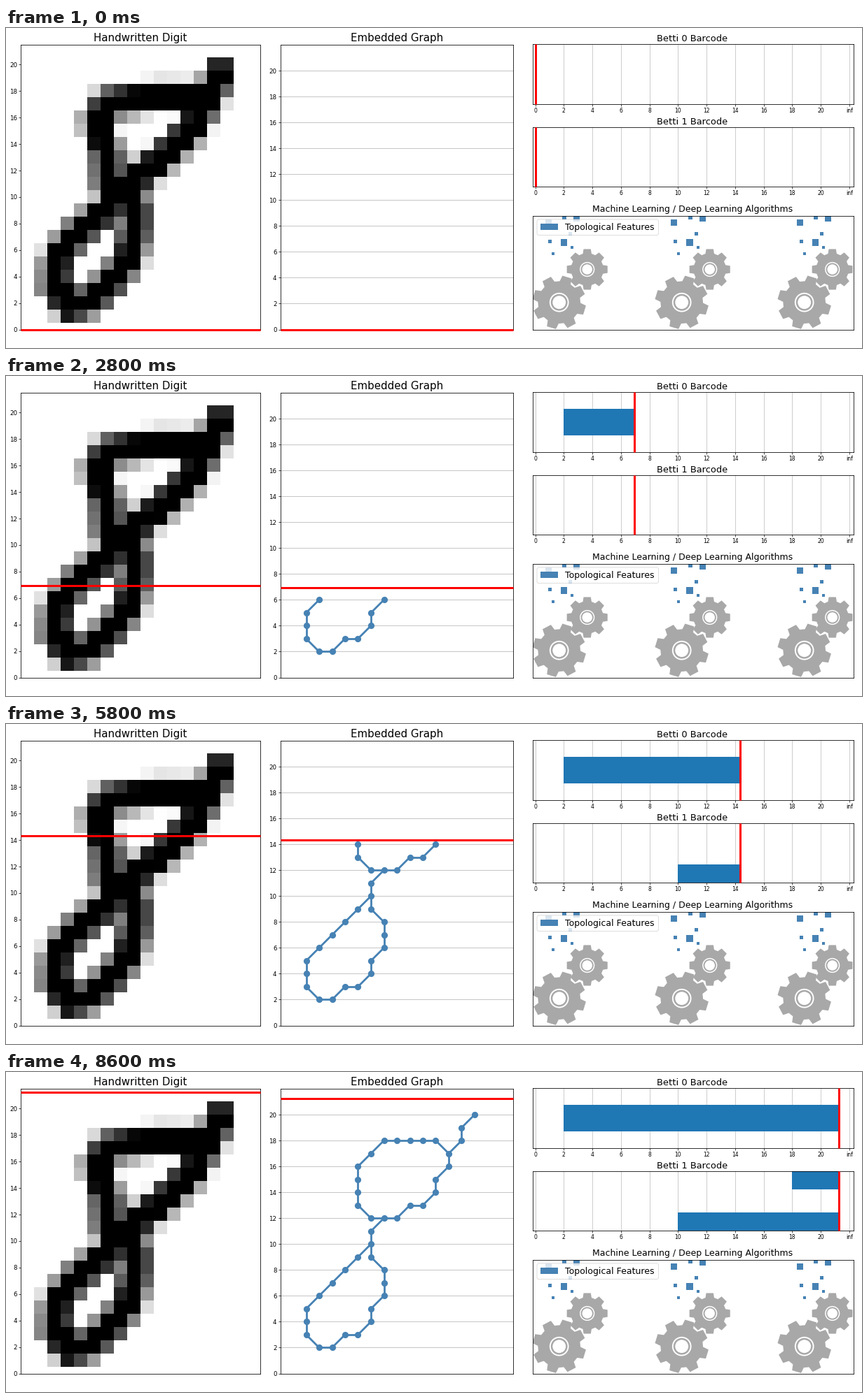
A matplotlib script for the animation above (8700 ms loop, 1222x458 px).

```python
import numpy as np
import matplotlib.pyplot as plt
from matplotlib.animation import FuncAnimation
from matplotlib.collections import LineCollection
from matplotlib.patches import Circle, FancyBboxPatch, Polygon, Rectangle

W, H, DPI = 1222, 458, 64
PT = 72 / DPI  # points per pixel
FRAMES, INTERVAL = 87, 100
STEP = 22 / 89  # sweep height gained per frame
STEEL, BLUE, GEAR, GRID = "steelblue", "#1f77b4", "#a8a8a8", "#b8b8b8"

plt.rcParams["font.family"] = "DejaVu Sans"
fig = plt.figure(figsize=(W / DPI, H / DPI), dpi=DPI, facecolor="white")


def panel(left, top, right, bottom, xlim, ylim):
    ax = fig.add_axes([left / W, 1 - bottom / H, (right - left) / W, (bottom - top) / H])
    ax.set(xlim=xlim, ylim=ylim, xticks=[], yticks=[])
    for spine in ax.spines.values():
        spine.set_linewidth(0.8 * PT)
    return ax


def title(x, baseline, text, size):
    fig.text(x / W, 1 - baseline / H, text, size=size * PT, ha="center", va="baseline")


def ticks(ax, axis, size):
    ax.tick_params(axis=axis, labelsize=size * PT, length=2.7 * PT,
                   width=0.7 * PT, pad=2.4 * PT)


# Handwritten digit: one soft pen stroke sampled at the cell centres
PEN = np.array([(14.5, 19.4), (14, 18.2), (12.4, 15.2), (10.3, 13.1), (7.5, 10.8),
                (5.9, 9), (3.4, 6.9), (2.2, 5.2), (2.1, 3.2), (3.2, 1.7), (4.8, 2.2),
                (6.6, 3.9), (7.7, 5.6), (8.1, 7.5), (8.1, 9.3), (6.1, 10.8), (6, 13.2),
                (5.2, 15.6), (6, 17), (9.5, 17.55), (13.6, 17.5)])


def pen_ink(cols=18, rows=22, radius=1.1, soft=0.9):
    cells = np.stack(np.meshgrid(np.arange(cols), np.arange(rows)), -1)
    dist = np.full((rows, cols), np.inf)
    for a, b in zip(PEN, PEN[1:]):
        t = np.clip((cells - a) @ (b - a) / ((b - a) @ (b - a)), 0, 1)
        gap = cells - a - t[..., None] * (b - a)
        dist = np.minimum(dist, np.hypot(gap[..., 0], gap[..., 1]))
    return np.clip((radius - dist) / soft + 0.5, 0, 1)


digit = panel(21, 24, 363, 431.5, (0, 18), (0, 21.5))
digit.imshow(pen_ink(), cmap="gray_r", vmin=0, vmax=1, origin="lower",
             extent=(0, 18, -0.5, 21.5), aspect="auto", interpolation="nearest")
digit.set(xlim=(0, 18), ylim=(0, 21.5), yticks=range(0, 21, 2))
ticks(digit, "y", 8.6)
title(191.5, 19, "Handwritten Digit", 15)


# Embedded graph: unit steps between corner points
def walk(*corners):
    path = [corners[0]]
    for x, y in corners[1:]:
        while path[-1] != (x, y):
            px, py = path[-1]
            path.append((px + int(np.sign(x - px)), py + int(np.sign(y - py))))
    return path


CHAINS = [
    walk((7, 10), (2, 5), (2, 3), (3, 2), (4, 2), (5, 3), (6, 3), (7, 4), (7, 5),
         (8, 6), (8, 8), (7, 9), (7, 11), (8, 12)),
    walk((7, 12), (6, 13), (6, 16), (8, 18), (12, 18), (13, 17), (13, 16), (12, 15),
         (12, 14), (11, 13), (10, 13), (9, 12), (7, 12)),
    walk((13, 17), (14, 18), (14, 19), (15, 20)),
]
NODES = np.array(sorted({p for chain in CHAINS for p in chain}))
EDGES = np.array([pair for chain in CHAINS for pair in zip(chain, chain[1:])])

graph = panel(391.5, 24, 724.5, 431.5, (0, 18), (0, 22))
graph.set_yticks(range(0, 21, 2))
ticks(graph, "y", 8.6)
graph.grid(axis="y", color=GRID, lw=0.8 * PT)
graph.set_axisbelow(True)
title(558, 19, "Embedded Graph", 15)
edges = graph.add_collection(LineCollection([], colors=STEEL, linewidths=2.8 * PT, zorder=2))
nodes, = graph.plot([], [], "o", color=STEEL, ms=9.2 * PT, mew=0, zorder=2.1)

# Barcodes
X0, UNIT = 755.5, 20.38


def barcode(top, bottom, text):
    ax = panel(751.5, top, 1209.5, bottom,
               ((751.5 - X0) / UNIT, (1209.5 - X0) / UNIT), (bottom, top))
    ax.set_xticks(range(0, 23, 2), [*map(str, range(0, 21, 2)), "inf"])
    ticks(ax, "x", 7.6)
    ax.grid(axis="x", color=GRID, lw=0.7 * PT)
    ax.set_axisbelow(True)
    title(980, top - 4.5, text, 13)
    return ax


def bar(ax, birth, top, bottom):
    return birth, ax.add_patch(Rectangle((birth, top), 0, bottom - top, fc=BLUE, lw=0))


betti0 = barcode(23.5, 108.5, "Betti 0 Barcode")
betti1 = barcode(142, 227, "Betti 1 Barcode")
bars = [bar(betti0, 2, 46.5, 85), bar(betti1, 10, 200.5, 227), bar(betti1, 18, 142, 168)]

# Learning panel, laid out in pixels
learn = panel(751.5, 268.5, 1209.5, 431.5, (751.5, 1209.5), (431.5, 268.5))
title(980, 263, "Machine Learning / Deep Learning Algorithms", 12.5)


def gear(x, y, size, turn, teeth=8):
    pts = []
    for k in range(teeth):
        mid = np.radians(turn) + 2 * np.pi * k / teeth
        for r, da in ((0.79, -0.27), (1, -0.175), (1, 0.175), (0.79, 0.27)):
            pts.append((x + size * r * np.cos(mid + da), y - size * r * np.sin(mid + da)))
    learn.add_patch(Polygon(pts, fc=GEAR, lw=0))
    for r, color in ((0.36, "white"), (0.31, GEAR), (0.245, "white")):
        learn.add_patch(Circle((x, y), size * r, fc=color, lw=0))


# centre and side of each square in the falling cluster
SQUARES = [(774, 278, 9), (797, 270.5, 6), (814.5, 272, 9), (805.5, 294, 5),
           (776, 305, 5), (796.5, 307, 9.5), (808, 313.5, 4), (780.5, 322.5, 4)]
for i in range(3):
    gear(789.7 + 175 * i, 392.7, 38.5, 28)
    gear(829.7 + 175 * i, 345.5, 29.5, 0)
    for x, y, s in SQUARES:
        learn.add_patch(Rectangle((x + 179.5 * i - s / 2, y - s / 2), s, s, fc=STEEL, lw=0))

learn.add_patch(FancyBboxPatch((760, 276), 169.5, 18.5, boxstyle="round,pad=2,rounding_size=2.5",
                               fc="white", ec="#cccccc", lw=0.8 * PT, alpha=0.8, zorder=3))
learn.add_patch(Rectangle((763, 280), 25, 9, fc=STEEL, lw=0, zorder=4))
learn.text(797.5, 288.6, "Topological Features", size=12.5 * PT, va="baseline", zorder=4)

# Sweep lines
RED = dict(color="red", lw=3 * PT, zorder=3, clip_on=False, solid_capstyle="butt")
levels = [ax.axhline(0, **RED) for ax in (digit, graph)]
cursors = [ax.axvline(0, **RED) for ax in (betti0, betti1)]


def update(frame):
    v = STEP * frame
    for line in levels:
        line.set_ydata([v, v])
    for line in cursors:
        line.set_xdata([v, v])
    nodes.set_data(*NODES[NODES[:, 1] <= v].T)
    edges.set_segments(EDGES[EDGES[:, :, 1].max(axis=1) <= v])
    for birth, rect in bars:
        rect.set_width(max(0, v - birth))
    return [*levels, *cursors, nodes, edges]


anim = FuncAnimation(fig, update, frames=FRAMES, interval=INTERVAL,
                     repeat=True, repeat_delay=0, blit=False)
plt.show()
```
